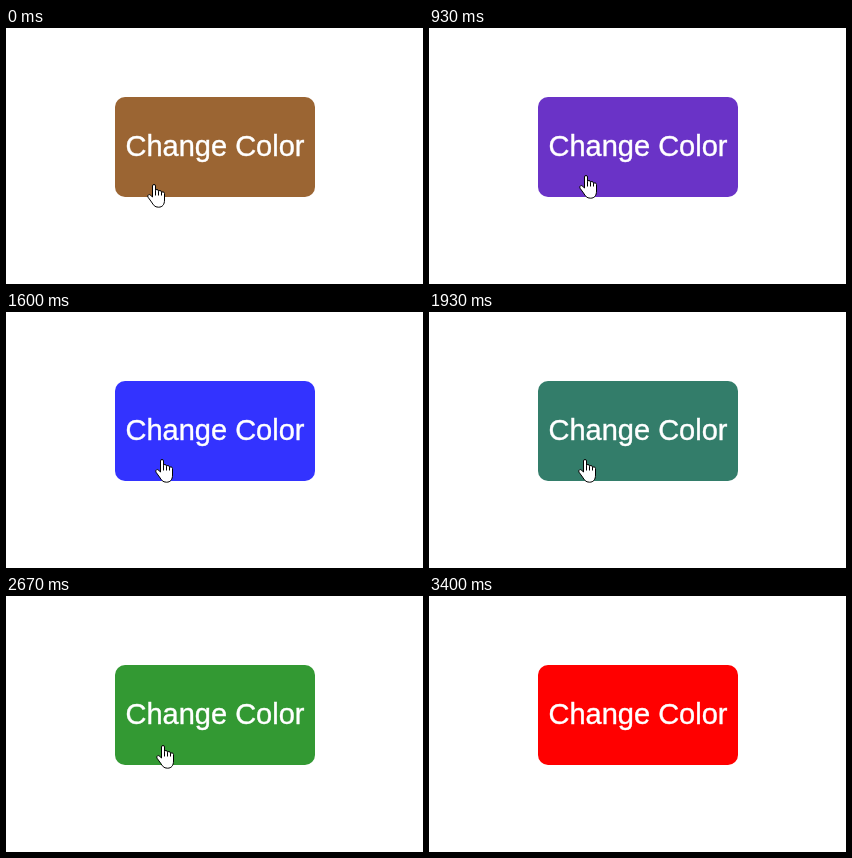
An HTML page with a canvas that plays this animation: 417x256 px, repeating every 3870 ms.

```html
<!DOCTYPE html>
<html lang="en">
<head>
<meta charset="utf-8">
<title>Change Color</title>
<style>
  html, body { margin: 0; width: 100%; height: 100%; overflow: hidden; background: #fff; }
  canvas { display: block; width: 417px; height: 256px; }
</style>
</head>
<body>
<canvas id="stage" width="417" height="256"></canvas>
<script>
const ctx = document.getElementById('stage').getContext('2d');
const LOOP = 3870;
const FADE = 200;
const GONE = 3400;
const BOX = { x: 109, y: 69, w: 200, h: 100, r: 10 };

// Each click fades the button to the next colour in the cycle.
const cycle = [[0, 128, 0], [255, 0, 0], [0, 0, 255]];
const clicks = [-102, 784, 1784, 2853];

// The pointer rests between moves; each one speeds up towards its end.
const rest = { x: 147, y: 156 };
const moves = [
  { start: 0, end: 200, x: 145, y: 181 },
  { start: 330, end: 530, x: 156, y: 147 },
  { start: 1000, end: 1200, x: 153, y: 183 },
  { start: 1400, end: 1600, x: 155, y: 147 },
  { start: 2130, end: 2330, x: 151, y: 178 },
  { start: 2530, end: 2670, x: 156, y: 149 },
  { start: 3000, end: 3330, x: 87, y: 246 }
];

const arrow = new Path2D('M.5 .5V16.5L4.5 12.8L7 18.2L9.4 17.2L7 11.6H11.5Z');
const hand = new Path2D(
  'M5.5 13V2Q5.5 .5 7 .5T8.5 2V6.5Q8.8 5.5 10 5.5T11.5 7V7.5Q11.9 6.5 13 6.5' +
  'T14.5 8V8.8Q14.9 7.8 16 7.8T17.5 9.5V16C17.5 20.5 15.5 23.2 11.5 23.2' +
  'C7.5 23.2 6.5 21 4.5 18L1 13.2Q.2 11.6 1.5 10.8T4 11.6Z');
const fingers = new Path2D('M8.5 6.5V11.5M11.5 7.5V11.5M14.5 8.8V11.5');

const mix = (a, b, k) => a + (b - a) * k;
const progress = (t, start, end) => Math.max(0, Math.min(1, (t - start) / (end - start)));

// The picture advances 15 times a second, on 10 ms boundaries.
function stepTime(t) {
  const at = n => Math.round(n * 20 / 3) * 10;
  let n = Math.ceil(t * 3 / 200) + 1;
  while (at(n) > t) n--;
  return at(n);
}

function colorAt(t) {
  const i = clicks.filter(c => c <= t).length - 1;
  const from = cycle[i % 3], to = cycle[(i + 1) % 3];
  const k = progress(t, clicks[i], clicks[i] + FADE);
  return `rgb(${from.map((v, c) => Math.round(mix(v, to[c], k)))})`;
}

function pointerAt(t) {
  let { x, y } = rest;
  for (const m of moves) {
    const k = progress(t, m.start, m.end) ** 3;
    x = mix(x, m.x, k);
    y = mix(y, m.y, k);
  }
  return { x: Math.round(x), y: Math.round(y) };
}

function drawButton(color, hover) {
  ctx.globalAlpha = hover ? 0.8 : 1;
  ctx.fillStyle = color;
  ctx.beginPath();
  ctx.roundRect(BOX.x, BOX.y, BOX.w, BOX.h, BOX.r);
  ctx.fill();
  ctx.globalAlpha = 1;
  ctx.fillStyle = ctx.strokeStyle = '#fff';
  ctx.lineWidth = 0.4;
  ctx.font = '29px "Liberation Sans", Arial, sans-serif';
  ctx.textAlign = 'center';
  const label = ['Change Color', BOX.x + BOX.w / 2, 128];
  ctx.fillText(...label);
  ctx.strokeText(...label);
}

function drawPointer({ x, y }, hover) {
  const shape = hover ? hand : arrow;
  ctx.save();
  ctx.translate(hover ? x - 6 : x, y);
  ctx.fillStyle = '#fff';
  ctx.strokeStyle = '#000';
  ctx.lineWidth = 1;
  ctx.fill(shape);
  ctx.stroke(shape);
  if (hover) ctx.stroke(fingers);
  ctx.restore();
}

function draw(t) {
  const visible = t < GONE;
  const pos = pointerAt(t);
  const hover = visible && pos.x >= BOX.x && pos.y < BOX.y + BOX.h;
  ctx.fillStyle = '#fff';
  ctx.fillRect(0, 0, 417, 256);
  drawButton(colorAt(t), hover);
  if (visible) drawPointer(pos, hover);
}

const start = performance.now();
function tick() {
  draw(stepTime((performance.now() - start) % LOOP));
  requestAnimationFrame(tick);
}
tick();
</script>
</body>
</html>
```
